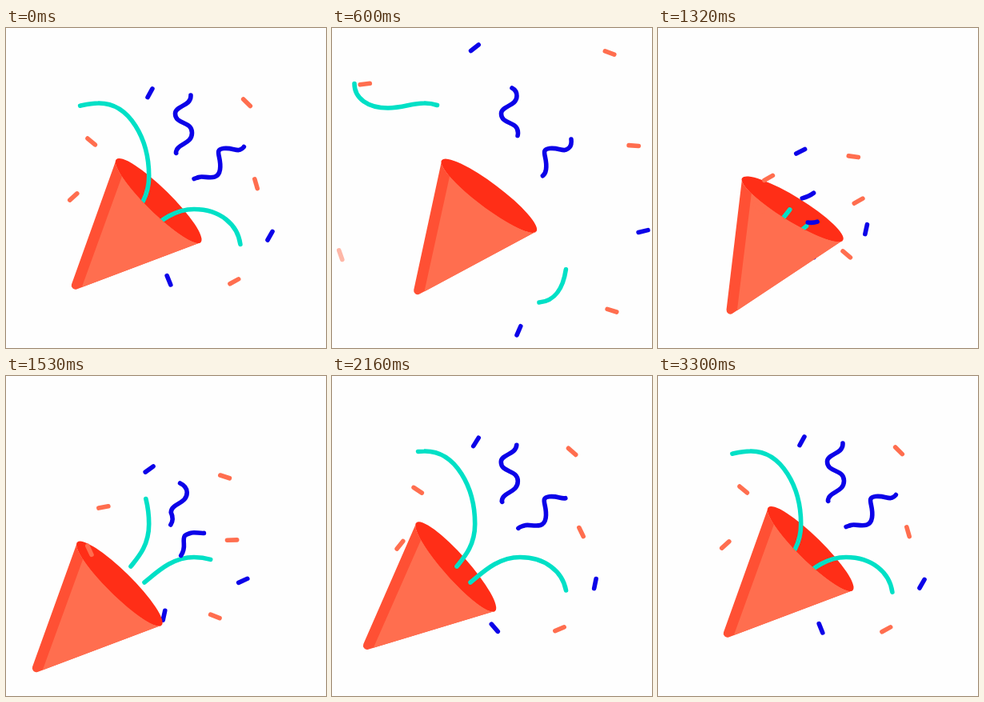
Recreate the animation shown at these times as an HTML page. Size 400x400 px, loop 5330 ms.

```html
<!DOCTYPE html>
<html lang="en">
<head>
<meta charset="utf-8">
<title>Party popper</title>
<style>
  html, body { margin: 0; width: 100%; height: 100%; overflow: hidden; background: #fefefe; }
  svg { display: block; width: 100%; height: 100%; }
  path, line { stroke-linecap: round; }
</style>
</head>
<body>
<svg viewBox="0 0 400 400">
  <g id="back"></g>
  <g class="cone"><ellipse cx="149.3" rx="15.5" ry="74" fill="#ff2e17"/></g>
  <g id="streamers" fill="none" stroke-width="5.6"></g>
  <g class="cone">
    <path fill="#ff5034" d="M149.3 -74A15 74 0 0 0 149.3 74L-1.1 4.5A5 5 0 0 1 -1.1 -4.5Z"/>
    <path fill="#ff6e4f" d="M139 -54A15 74 0 0 0 149.3 74L5 7.4Z"/>
  </g>
  <g id="front"></g>
</svg>
<script>
const LOOP = 5330, BURST = 1170, EMERGE = 1290, FLIGHT = 1400, SETTLED = 3300;
const ORANGE = '#ff6e4f', BLUE = '#0c02e8', TEAL = '#00e0c6';
const MOUTH = { x: 176, y: 242 }, PULL = 0.455;

const $ = id => document.getElementById(id);
const clamp = v => Math.min(1, Math.max(0, v));
const mix = (a, b, u) => a + (b - a) * u;
const easeOut = (u, power) => 1 - Math.pow(1 - clamp(u), power);
// What remains of the burst: 1 shortly after it, 0 at the given end.
const remaining = (t, end, power) => Math.pow(Math.max(0, (end - t) / (end - 1320)), power);

function add(parent, tag, attrs) {
  const el = document.createElementNS('http://www.w3.org/2000/svg', tag);
  for (const k in attrs) el.setAttribute(k, attrs[k]);
  return parent.appendChild(el);
}

// Smooth interpolation through [time, value] keys without overshoot.
function track(keys) {
  const last = keys.length - 1;
  const slope = i => (keys[i + 1][1] - keys[i][1]) / (keys[i + 1][0] - keys[i][0]);
  const tangent = keys.map((k, i) => {
    if (i === 0 || i === last) return 0;
    const a = slope(i - 1), b = slope(i);
    return a * b > 0 ? 2 * a * b / (a + b) : 0;
  });
  return t => {
    const i = keys.findIndex(k => k[0] > t) - 1;
    if (i < 0) return keys[last][1];
    const [t0, v0] = keys[i], [t1, v1] = keys[i + 1];
    const d = t1 - t0, u = (t - t0) / d, w = 1 - u;
    return v0 * (1 + 2 * u) * w * w + v1 * (3 - 2 * u) * u * u
      + d * u * w * (w * tangent[i] - u * tangent[i + 1]);
  };
}

// Cone: tip and axis angle at rest, winding up, firing, recoiling, then back.
const rest = [86, 322.5, -45.5];
const poses = [
  [0, ...rest], [600, 106.5, 329, -53], [1320, 90, 353.5, -58.4],
  [1540, 36, 366, -45], [1690, 27.5, 353, -40.2], [3080, ...rest]
];
const [tipX, tipY, tilt] = [1, 2, 3].map(i => track(poses.map(p => [p[0], p[i]])));
const cones = document.querySelectorAll('.cone');

// Streamers: the visible part of a path runs from tail to head.
// They slide off the far end, then shoot out again from the start.
const streamers = [
  { color: TEAL, head: [93, 97], gone: 790, speed: 4.6,
    d: 'M156 238C164 228 178.7 213 178.7 185C178.7 140 155 93 115 94C100 94 88 100 70 100C45 100 28 88 28 69.5' },
  { color: TEAL, head: [293, 270], gone: 690, speed: 7.4,
    d: 'M173 258C188 246 207 226.5 235 226.5C268 226.5 290 246 293 271C296 305 288 341 259 343' },
  { color: BLUE, tail: [213.5, 156], head: [231, 85], gone: 1150, speed: 7.9, drift: [-13, 30],
    d: 'M193 183C208 179 219 170 212.5 156C213 144 232.5 146 232.5 131S211.5 121 211.5 107'
      + 'C211.5 97 231 98 231 85C231 80 229 77 225 75' },
  { color: BLUE, tail: [235, 188.5], head: [297, 149], gone: 1150, speed: 5.5, drift: [-20, 20],
    d: 'M207 223C225 226 233 212 232 200S234 189 241 186.5S265 193 267.5 177S259 152 272 150.5'
      + 'S290 157 297 149C299.5 146 299.5 143 299 139' }
].map(s => {
  const el = add($('streamers'), 'path', { d: s.d, stroke: s.color });
  const total = el.getTotalLength();
  const lengthAt = ([x, y]) => {
    let best = 0, min = Infinity;
    for (let at = 0; at <= total; at += 0.5) {
      const p = el.getPointAtLength(at), dist = Math.hypot(p.x - x, p.y - y);
      if (dist < min) { min = dist; best = at; }
    }
    return best;
  };
  return { drift: [0, 0], ...s, el, total, tail: s.tail ? lengthAt(s.tail) : 0, head: lengthAt(s.head) };
});

function drawStreamer(s, t) {
  const leaving = t < EMERGE;
  const shot = from => easeOut((t - from) / (SETTLED - from), s.speed);
  const tail = leaving ? mix(s.tail, s.total, clamp(t / s.gone) ** 2) : s.tail * shot(1320);
  const head = leaving ? mix(s.head, s.total, easeOut(t / 600, 2)) : s.head * shot(EMERGE);
  const k = leaving ? 0 : remaining(t, 2700, 4.4);
  s.el.setAttribute('visibility', head - tail > 0.5 ? 'visible' : 'hidden');
  s.el.setAttribute('stroke-dasharray', `${Math.max(head - tail, 0.1)} ${s.total * 2}`);
  s.el.setAttribute('stroke-dashoffset', -tail);
  s.el.setAttribute('transform', `translate(${s.drift[0] * k} ${s.drift[1] * k})`);
}

// Confetti in the order in which they fade: colour, resting x, y, angle,
// flight dx, dy, spin.
const confetti = [
  [ORANGE, 84.3, 211, -42, -91, 90, -100],
  [ORANGE, 106.7, 142, 40, -81, -89, -70],
  [BLUE, 330, 259.7, -60, 73, -7, -198],
  [ORANGE, 312.5, 194.7, 74, 80, -59, -104],
  [ORANGE, 285.3, 316.8, -29, 80, 45, 69],
  [BLUE, 203.5, 315.3, 68, 37, 78, -200, 'back'],
  [BLUE, 180, 81.3, -61, -2, -70, 34],
  [ORANGE, 301, 93.3, 45, 57, -77, -37]
].map(([color, x, y, angle, dx, dy, spin, layer = 'front'], i) => {
  const piece = () => add($(layer), 'line', { x1: -6.1, x2: 6.1, stroke: color, 'stroke-width': 5.6 });
  return { x, y, angle, dx, dy, spin, fadeAt: 540 + 94 * i, leaving: piece(), coming: piece() };
});

function place(el, x, y, angle, alpha) {
  el.setAttribute('transform', `translate(${x} ${y}) rotate(${angle})`);
  el.setAttribute('opacity', alpha);
}

function drawConfetti(c, t) {
  const u = t / FLIGHT, out = easeOut(Math.pow(u, 1.5), 5);
  place(c.leaving, c.x + c.dx * out, c.y + c.dy * out, c.angle + c.spin * easeOut(u, 2),
    1 - clamp((t - c.fadeAt) / 120));
  const pull = PULL * remaining(t, 2700, 4.4);
  place(c.coming, mix(c.x, MOUTH.x, pull), mix(c.y, MOUTH.y, pull),
    c.angle + c.spin * remaining(t, 2340, 1.36), t < BURST ? 0 : 1);
}

function draw(t) {
  const pose = `translate(${tipX(t)} ${tipY(t)}) rotate(${tilt(t)})`;
  cones.forEach(g => g.setAttribute('transform', pose));
  streamers.forEach(s => drawStreamer(s, t));
  confetti.forEach(c => drawConfetti(c, t));
}

const start = performance.now();
function tick() {
  draw((performance.now() - start) % LOOP);
  requestAnimationFrame(tick);
}
tick();
</script>
</body>
</html>
```
